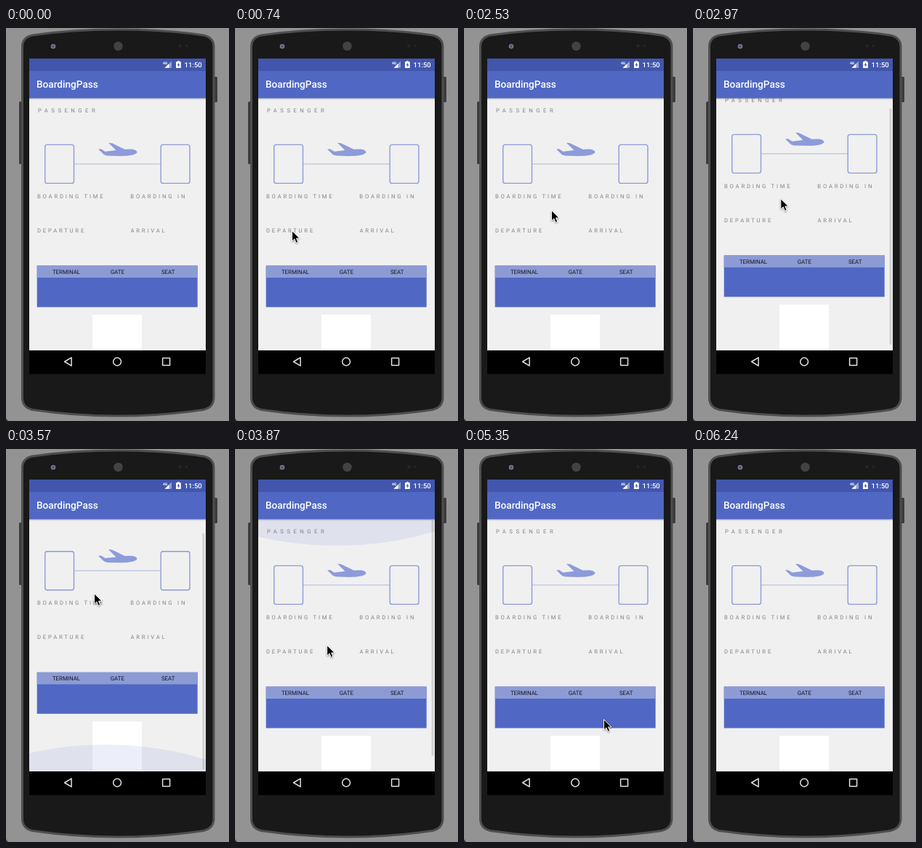
Animation, 307 px wide and 540 px high, one loop 7.59 s. Source, as an HTML page:

```html
<!DOCTYPE html>
<html lang="en">
<head>
<meta charset="utf-8">
<title>Boarding pass</title>
<style>
  html, body { margin: 0; width: 100%; height: 100%; overflow: hidden; background: #939393; }
  svg { display: block; width: 100vw; height: 100vh; }
  text { font-family: Roboto, sans-serif; text-rendering: geometricPrecision; }
  .label { font-size: 7.7px; fill: #838383; letter-spacing: 2.8px; }
  .wide { letter-spacing: 4.5px; }
  .head { font-size: 7.9px; fill: #15171f; text-anchor: middle; }
  .title { font-size: 13.6px; font-weight: 500; fill: #fff; }
  .clock { font-size: 9.5px; font-weight: 500; fill: #fff; }
  .nav { fill: none; stroke: #e2e2e2; stroke-width: 1.5; stroke-linejoin: round; }
  .slot { fill: none; stroke: #8d9bdb; stroke-width: 1.4; }
  .glow { fill: #5068c8; }
  #cursor { filter: drop-shadow(0 1px 1px rgba(0, 0, 0, .4)); }
</style>
</head>
<body>
<svg viewBox="0 0 307 540">
  <defs>
    <linearGradient id="shade" x2="0" y2="1">
      <stop stop-color="#000" stop-opacity=".25"/>
      <stop offset="1" stop-color="#000" stop-opacity="0"/>
    </linearGradient>
    <pattern id="mesh" width="2" height="2" patternUnits="userSpaceOnUse">
      <rect width="2" height="2" fill="#303030"/>
      <circle cx="1" cy="1" r=".6" fill="#808080"/>
    </pattern>
    <clipPath id="page"><rect x="32" y="96" width="243" height="347"/></clipPath>
  </defs>

  <rect width="307" height="540" fill="#939393"/>
  <path d="M0 536Q1 539 4 540H0Z" fill="#333"/>

  <!-- phone -->
  <rect x="18" y="101" width="5" height="86" rx="1.5" fill="#3b3b3b"/>
  <rect x="286" y="67" width="5" height="35" rx="1.5" fill="#3b3b3b"/>
  <path d="M22.500 26Q22.500 13 36 10Q90 2 154 2T272 10Q286 13 286 26V508Q286 521 272 524.500Q214 533 154 533T36 524.500Q22.500 521 22.500 508Z"
        fill="#191919" stroke="#4e4e4e" stroke-width="3"/>
  <circle cx="65" cy="25.300" r="3.300" fill="#77798c"/>
  <circle cx="65" cy="25.300" r="1.700" fill="#4a5078"/>
  <circle cx="154.500" cy="25" r="6.200" fill="url(#mesh)"/>
  <circle cx="239.500" cy="24.500" r="2.300" fill="#262626"/>
  <circle cx="248.500" cy="24.500" r="1.800" fill="#262626"/>

  <!-- page -->
  <rect x="32" y="42" width="243" height="433.500" fill="#000"/>
  <g clip-path="url(#page)">
    <rect x="32" y="96" width="243" height="347" fill="#f0f0f0"/>
    <g id="content">
      <text class="label wide" x="44" y="116.200">PASSENGER</text>
      <path d="M94 186.900H213" stroke="#adb6dc"/>
      <rect class="slot" x="53.700" y="160.400" width="39.800" height="53" rx="3"/>
      <rect class="slot" x="213.200" y="160.400" width="39.800" height="53" rx="3"/>
      <path d="M127 166.500L131 166.300L136.500 169.800L151.500 168.100L141 157.800L146 158.300L163.500 166.800L172 166.500C177 166.500 180.500 168.800 180.500 171C178 174.600 169 175.900 158 175.900L140 175.600Q134.500 174.800 132.500 171.800Z" fill="#8d9bdb"/>
      <text class="label" x="43" y="233.700">BOARDING TIME</text>
      <text class="label" x="171.300" y="233.700">BOARDING IN</text>
      <text class="label" x="43" y="280.800">DEPARTURE</text>
      <text class="label" x="171.500" y="280.800">ARRIVAL</text>
      <rect x="42.700" y="326.500" width="221" height="57" fill="#5068c4"/>
      <rect x="42.700" y="326.500" width="221" height="16.500" fill="#8d9bd5"/>
      <text class="head" x="83" y="338">TERMINAL</text>
      <text class="head" x="153.300" y="338">GATE</text>
      <text class="head" x="223.200" y="338">SEAT</text>
      <rect x="119" y="394" width="68" height="68" rx="1" fill="#fff"/>
    </g>
    <rect id="bar" x="270.600" y="97.500" width="2.700" height="324" fill="#cfcfcf"/>
    <ellipse class="glow" id="topGlow" rx="365"/>
    <ellipse class="glow" id="bottomGlow" rx="365"/>
    <rect x="32" y="96" width="243" height="3" fill="url(#shade)"/>
  </g>

  <!-- bars -->
  <rect x="32" y="42" width="243" height="16.500" fill="#4256ad"/>
  <rect x="32" y="58.300" width="243" height="38.200" fill="#5068c4"/>
  <text class="title" x="42" y="82.100">BoardingPass</text>
  <text x="216" y="49.500" font-size="5" font-weight="700" fill="#fff">4G</text>
  <path d="M218.500 54.800L228 45.500V54.800Z" fill="#fff" fill-opacity=".45"/>
  <path d="M218.500 54.800L224.500 49V54.800Z" fill="#fff"/>
  <path d="M234 46.300H236V45.200H238.800V46.300H240.800V55H234Z" fill="#fff"/>
  <path d="M238 47.500L235.500 51.200H237.200V53.800L239.500 50.200H238Z" fill="#4256ad"/>
  <text class="clock" x="245.600" y="53.700">11:50</text>
  <g transform="translate(-.4 0)">
    <path class="nav" d="M81 458.500L90.500 452.800V464.200Z"/>
    <circle class="nav" cx="153.500" cy="458.500" r="5.400"/>
    <rect class="nav" x="216" y="453.500" width="10" height="10" rx=".5"/>
  </g>

  <path id="cursor" d="M.5.7V15L3.900 11.900L6.200 17.300L8.800 16.200L6.500 11H11Z" fill="#000" stroke="#fff" stroke-linejoin="round"/>
</svg>
<script>
  const LOOP = 7590, TICKS = 51;            // the screen refreshes once per tick
  const ENTER = 3, GRAB = 19, TURN = 24, RELEASE = 27, LEAVE = 42;
  const GRAB_Y = 248, TURN_Y = 198, MAX_SCROLL = 19.7;

  const byId = id => document.getElementById(id);
  const clamp = (v, low, high) => Math.min(Math.max(v, low), high);
  const linear = k => k;
  const easeOut = k => Math.sin(k * Math.PI / 2);
  const easeIn = k => k ** 3;

  const moves = [
    { from: ENTER, to: 5, x: 78, y: 278, ease: linear },
    { from: 7, to: 9, x: 102, y: 270, ease: linear },
    { from: 12, to: 13, x: 122, y: 247, ease: linear },
    { from: 13, to: 14, x: 121, y: 233, ease: linear },
    { from: 14, to: 17, x: 120, y: 250, ease: easeOut },
    { from: GRAB, to: TURN, x: 121, y: TURN_Y, ease: easeOut },
    { from: TURN, to: RELEASE, x: 127, y: 280, ease: easeOut },
    { from: RELEASE, to: 30, x: 127, y: 284, ease: linear },
    { from: 30, to: 36, x: 192, y: 371, ease: k => k ** 2 },
    { from: 37, to: 41, x: 271, y: 524, ease: linear }
  ];

  function pointerAt(tick) {
    const p = { x: 74, y: 365 };
    for (const { from, to, x, y, ease } of moves) {
      const k = ease(clamp((tick - from) / (to - from), 0, 1));
      p.x += (x - p.x) * k;
      p.y += (y - p.y) * k;
    }
    return p;
  }

  // Dragging past the end of the page pulls out a glow, which relaxes afterwards.
  const pull = distance => clamp((distance - MAX_SCROLL) / 38, 0, .75);
  const relax = (tick, from, length) => clamp(1 - (tick - from) / length, 0, 1);

  function drawGlow(id, size, edge, side, x) {
    const glow = byId(id), ry = 365 * size;
    glow.setAttribute("cx", 153.5 + (x - 153.5) / 2);
    glow.setAttribute("cy", edge + side * (49 * size - ry));
    glow.setAttribute("ry", ry);
    glow.setAttribute("opacity", .19 * size * size);
  }

  function draw(now) {
    const tick = Math.floor((now % LOOP + 12) * TICKS / LOOP) % TICKS;
    const { x, y } = pointerAt(tick);
    const lifted = tick > GRAB ? GRAB_Y - pointerAt(Math.min(tick, TURN)).y : 0;
    const lowered = tick > TURN ? pointerAt(Math.min(tick, RELEASE)).y - TURN_Y : 0;
    const scroll = clamp(lifted, 0, MAX_SCROLL) - clamp(lowered, 0, MAX_SCROLL);

    byId("cursor").setAttribute("transform", `translate(${x} ${y})`);
    byId("cursor").setAttribute("visibility", tick >= ENTER && tick < LEAVE ? "visible" : "hidden");
    byId("content").setAttribute("transform", `translate(0 ${-scroll})`);
    byId("bar").setAttribute("transform", `translate(0 ${scroll * .945})`);
    byId("bar").setAttribute("opacity", tick > GRAB ? relax(tick, 30, 2) : 0);
    drawGlow("bottomGlow", pull(lifted) * relax(tick, TURN, 2), 443, -1, x);
    drawGlow("topGlow", pull(lowered) * relax(tick, RELEASE, 5), 96, 1, x);
  }

  const start = performance.now();
  function loop() {
    draw(performance.now() - start);
    requestAnimationFrame(loop);
  }
  loop();
</script>
</body>
</html>
```
